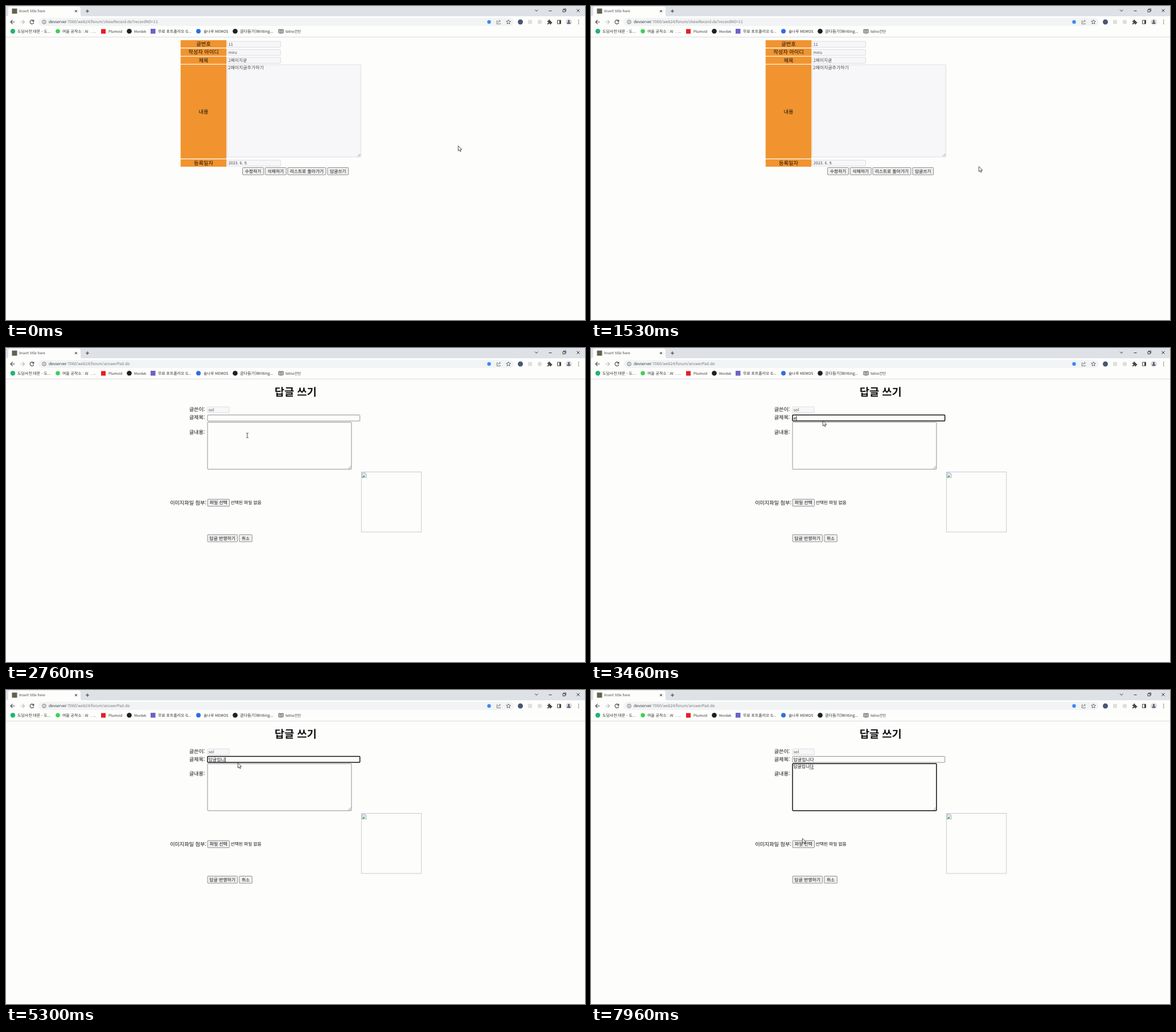
Recreate the animation shown at these times as an HTML page. Size 1017 px wide and 551 px high, loop 8000 ms.

```html
<!DOCTYPE html>
<html lang="ko">
<head>
<meta charset="utf-8">
<title>Reply form</title>
<style>
html, body { margin: 0; width: 100%; height: 100%; overflow: hidden; background: #fdfdfc; }
svg { display: block; width: 100vw; height: 100vh; }
text { font-family: "Noto Sans CJK KR", "Noto Sans CJK", "Open Sans", sans-serif; text-rendering: geometricPrecision; white-space: pre; }
</style>
</head>
<body>
<svg id="stage" viewBox="0 0 1017 551" preserveAspectRatio="none"></svg>
<script>
const LOOP = 8000;
const stage = document.getElementById('stage');

// Markup helpers
const rect = (x, y, w, h, fill, more = '') =>
  `<rect x="${x}" y="${y}" width="${w}" height="${h}" fill="${fill}" ${more}/>`;
const circle = (x, y, r, fill, more = '') =>
  `<circle cx="${x}" cy="${y}" r="${r}" fill="${fill}" ${more}/>`;
const line = (d, color = '#444', width = 1, more = '') =>
  `<path d="${d}" fill="none" stroke="${color}" stroke-width="${width}" ${more}/>`;
const text = (x, y, size, str, fill = '#111', more = '') =>
  `<text x="${x}" y="${y}" font-size="${size}" fill="${fill}" ${more}>${str}</text>`;
const box = (x, y, w, h, stroke, fill = '#fdfdfc', more = '') =>
  rect(x, y, w, h, fill, `stroke="${stroke}" stroke-width=".8" rx="1" ${more}`);
const disabled = (x, y, w, h) => box(x, y, w, h, '#d6d6da', '#f7f7fa');
const button = (x, y, w, h, label, size = 7.75, id = '') =>
  box(x, y, w, h, '#767676', '#efefef', id && `id="${id}"`) +
  text(x + w / 2, y + h / 2 + 2.9, size, label, '#111', 'text-anchor="middle"');
const grip = (x, y) => line(`M${x - 5} ${y}l5-5M${x - 2.2} ${y}l2.2-2.2`, '#777', .7);

function browser() {
  const marks = [
    [20, 6.95, '도담사전:대문 - 도...'], [99, 6.9, '여울 공작소 : AI  . ...'],
    [180, 6.25, 'Plumvid'], [225, 6.1, 'Mordek'], [267, 6.9, '무료 포트폴리오 G...'],
    [347, 6.6, '솔나루 MEMOS'], [411, 7.1, '글다듬기(Writing...'], [491, 6.4, 'telno간단']
  ];
  return rect(0, 0, 1017, 18, '#dee1e6') +
    '<path d="M1 18q3 0 3-3V5q0-4 4-4H127q4 0 4 4v10q0 3 3 3z" fill="#fdfdfc"/>' +
    rect(0, 18, 1017, 36, '#fdfdfc') + rect(0, 54, 1017, 1, '#dcdce2') +
    rect(10.5, 4.5, 9, 9, '#65604f', 'id="favicon"') +
    text(23, 11.3, 6.36, 'Insert title here', '#444') +
    line('M121 7l4 4m0-4l-4 4', '#333') + line('M140 9h6m-3-3v6', '#333') +
    line('M929 6.5l2.7 2.7 2.7-2.7', '#333') + line('M953.5 8.5h5', '#333') +
    line('M978 6.5h4v4h-4zM979.5 6V5h4v4h-1', '#333', .9) +
    line('M1002.5 5.5l5 5m0-5l-5 5', '#333') +
    line('M15.5 28H8m3.5-3.5L8 28l3.5 3.5', '#444', 1.1) +
    line('M25 28h7.5M29 24.5l3.5 3.5-3.5 3.5', '#bbb', 1.1) +
    `<g id="reload">${line('M48.4 26.2A3.4 3.4 0 1 0 48.8 29', '#444', 1.1)}<path d="M49.3 23.8v3.6h-3.6z" fill="#444"/></g>` +
    `<g id="stop">${line('M42.5 25l6 6m0-6l-6 6', '#444', 1.2)}</g>` +
    rect(57, 21, 835, 14, '#f1f3f4', 'rx="7"') +
    circle(67, 28, 3.3, 'none', 'stroke="#555" stroke-width=".8"') +
    line('M67 27.4v2.4M67 25.8v.9', '#555', .9) +
    text(75, 30.4, 6.83, '<tspan>devserver</tspan><tspan id="path" fill="#777"></tspan>', '#333') +
    circle(848.5, 28, 3.2, '#4285f4') +
    line('M864 26h-1.8v5.5h6V30M864 29.5q.3-3 4-3.2m-1.6-2l2 2-2 2', '#666', .8) +
    line('M882.5 24.2l1.1 2.4 2.7.3-2 1.8.5 2.7-2.3-1.4-2.3 1.4.5-2.7-2-1.8 2.7-.3z', '#444', .8) +
    circle(903.5, 28, 4.5, '#4a5672') + rect(917, 24.5, 7, 7, '#dfdfdf') +
    circle(937.5, 28, 3.8, '#dddde2') +
    '<path d="M951 26h2q-.5-2.3 1.2-2.3t1.2 2.3h2v2q2-.3 2 1.2t-2 1.2v1.8h-2q0-1.7-1.2-1.7t-1.2 1.7h-2v-2q1.7 0 1.7-1.2t-1.7-1.2z" fill="#444"/>' +
    line('M968.5 25h6v6.2h-6z', '#444') + rect(972, 25, 3, 6, '#444') +
    circle(988.5, 28, 5.5, '#d9dce2') + circle(988.5, 26.4, 1.6, '#45484f') +
    '<path d="M985.3 31q0-2.6 3.2-2.6t3.2 2.6z" fill="#45484f"/>' +
    [25, 28, 31].map(y => circle(1005.7, y, .8, '#444')).join('') +
    circle(12, 44.3, 4.2, '#20b573') + circle(91, 44.3, 3.8, '#3fcf5a') +
    rect(167, 40.5, 8, 8, '#e81c24') + circle(216.5, 44.3, 4.3, '#1f2023') +
    rect(254, 40, 8.5, 8.5, '#6a62c8') + circle(338, 44.3, 4, '#2f6fe0') +
    circle(402.5, 44.3, 4.3, '#1f2023') +
    line('M483 41.8q-2-1-4-.6v6q2-.4 4 .6 2-1 4-.6v-6q-2-.4-4 .6v6M480.3 43.2h1.5m-1.5 1.7h1.5m2.4-1.7h1.5m-1.5 1.7h1.5', '#333', .9) +
    marks.map(([x, size, str]) => text(x, 46.7, size, str, '#333')).join('');
}

function article() {
  const rows = [
    [60, 13, '글번호'], [74.4, 13.2, '작성자 아이디'], [88.8, 12.8, '제목'],
    [102.8, 164.9, '내용'], [269, 13, '등록일자']
  ];
  const values = [[62, 7.1, '11'], [76.2, 6.9, 'miru'], [90, 7.6, '2페이지글'], [270.5, 7.1, '2023. 6. 9.']];
  return rows.map(([y, h, label]) => rect(306.7, y, 80.5, h, '#f1942f') +
      text(347, y + h / 2 + 3.4, 9.25, label, '#111', 'text-anchor="middle"')).join('') +
    values.map(([y, size, str]) => disabled(388.7, y, 93.7, 10.4) +
      text(390.8, y + 7.8, size, str, '#484848')).join('') +
    disabled(388.7, 103, 234.6, 162) + grip(622.5, 264) +
    text(390, 110.8, 7.95, '2페이지글추가하기', '#484848') +
    button(415.5, 283.5, 37, 12.7, '수정하기') + button(455.2, 283.5, 37, 12.7, '삭제하기') +
    button(494.8, 283.5, 67, 12.7, '리스트로 돌아가기') +
    button(564.8, 283.5, 36.8, 12.7, '답글쓰기', 7.75, 'replyButton');
}

function replyForm() {
  const label = (x, y, str) => text(x, y, 9.1, str, '#111', 'text-anchor="end"');
  const field = id => `<g id="${id}"><text font-size="7.8" fill="#111"></text>` +
    rect(0, 0, 0, .7, '#111') + rect(0, 0, .9, 8.2, '#111') + '</g>';
  return text(508.7, 83.6, 18.7, '답글 쓰기', '#111', 'text-anchor="middle" font-weight="700"') +
    label(349.3, 111.4, '글쓴이:') + label(349.3, 125.4, '글제목:') +
    disabled(354, 103.2, 38, 10.4) + text(355.8, 110.9, 7.1, 'sol', '#555') +
    '<g id="lower">' +
    box(354, 116.5, 267.6, 10.6, '#767676', '#fdfdfc', 'id="titleBox"') +
    box(354, 129.3, 252.8, 82.5, '#767676', '#fdfdfc', 'id="bodyBox"') + grip(606, 211) +
    field('title') + field('body') +
    label(349.3, 149.6, '글내용:') + label(351.8, 274, '이미지파일 첨부:') +
    button(354, 264.3, 38.5, 12.4, '파일 선택', 7.9) +
    text(394.5, 273.3, 7.75, '선택된 파일 없음') +
    rect(624.3, 216.5, 105.4, 105.4, 'none', 'stroke="#c4c4c4" stroke-width=".9"') +
    '<path d="M625.3 218h5.5l2.2 2.2v6.3h-7.7z" fill="#dbe5f5" stroke="#8f9aa8" stroke-width=".7"/>' +
    '<path d="M626 225.6l2.6-3.2 2 1.5-1.6 2z" fill="#4ca64c"/>' +
    line('M628.8 227l4.5-4', '#fdfdfc', 1) +
    button(354, 326.6, 52.5, 12.4, '답글 반영하기', 7.9) + button(409.7, 326.6, 22.6, 12.4, '취소', 7.5) +
    '</g>';
}

stage.innerHTML = rect(0, 0, 1017, 551, '#fdfdfc') + browser() +
  `<g id="article">${article()}</g><g id="form">${replyForm()}</g>` +
  '<path id="arrow" d="M.3.3v9l2.1-1.9 1.5 3 1.3-.6-1.4-3h2.9z" fill="#fff" stroke="#222" stroke-width=".8"/>' +
  `<g id="beam">${line('M-2-4h1.5l.5.5.5-.5H2M0-3.5v7M-2 4h1.5l.5-.5.5.5H2', '#222', .8)}</g>`;

const el = id => document.getElementById(id);
const show = (id, on) => el(id).setAttribute('visibility', on ? 'visible' : 'hidden');
const set = (node, attrs) => { for (const k in attrs) node.setAttribute(k, attrs[k]); };

// Pointer stops: time, x, y
const stops = [
  [0, 794, 245], [250, 790, 247], [710, 771, 252], [810, 766, 254], [1180, 724, 271],
  [1430, 724, 271], [1740, 592, 303], [1930, 577, 293], [2330, 577, 293],
  [2760, 424, 153.5], [2900, 404, 132.5], [2930, 404, 131.5], [3100, 404, 131.5],
  [3180, 407, 125], [3300, 407, 127.5], [7640, 407, 127.5], [7960, 371, 260]
];

function pointer(t) {
  const i = stops.findIndex(s => s[0] > t);
  if (i < 0) return stops.at(-1).slice(1);
  const [a, b] = [stops[i - 1], stops[i]];
  let k = (t - a[0]) / (b[0] - a[0]);
  if (a[0] === 7640) k = k * k * (3 - 2 * k);
  return [a[1] + (b[1] - a[1]) * k, a[2] + (b[2] - a[2]) * k];
}

// Each key press leaves one state of the syllables being composed
const steps = '답글입니다'.split('').length && [
  'ㄷ', '다', '답', '답ㄱ', '답그', '답글', '답글ㅇ', '답글이', '답글입',
  '답글입ㄴ', '답글입니', '답글입니ㄷ', '답글입니다'
];
const typed = times => times.map((time, i) => [time, steps[i]]);
const PAGE = 2330, CLICK = 3150, HANGUL = 4130, TAB = 5530;
const titleKeys = [[CLICK, ''], [3460, 'e'], [3600, 'ek'], [3830, 'e'], [4000, ''],
  ...typed([HANGUL, 4300, 4400, 4530, 4660, 4830, 4930, 5000, 5080, 5180, 5260, 5340, 5420])];
const bodyKeys = [[TAB, ''],
  ...typed([5830, 6100, 6200, 6360, 6480, 6560, 6730, 6800, 6870, 6950, 7020, 7090, 7160])];

function drawField(id, keys, x, y, t, focused) {
  const [time, str] = keys.findLast(k => k[0] <= t) || [0, ''];
  const [label, under, caret] = el(id).children;
  label.textContent = str;
  set(label, { x, y });
  const end = x + (str ? label.getComputedTextLength() : 0);
  const composing = focused && /[ㄱ-힣]$/.test(str);
  set(under, { x: end - 7.1, y: y + 1, width: composing ? 7 : 0 });
  const lit = focused && (t - time) % 1000 < 500;
  set(caret, { x: end + .2, y: y - 6.6, width: lit ? .9 : 0 });
}

function outline(id, focused) {
  set(el(id), { stroke: focused ? '#101010' : '#767676', 'stroke-width': focused ? 1.5 : .8 });
}

function draw(t) {
  const onForm = t >= PAGE;
  const loading = t >= 2100 && t < 2480;
  show('article', !onForm);
  show('form', onForm);
  show('favicon', !loading);
  show('reload', !loading);
  show('stop', loading);
  el('path').textContent = ':7060/web24/forum/' + (onForm ? 'answerPad.do' : 'showRecord.do?recordNO=11');

  const [x, y] = pointer(t);
  const over = x > 564 && x < 602 && y > 283 && y < 297;
  set(el('replyButton'), { fill: over ? '#e4e4e4' : '#efefef', stroke: over ? '#4c4c4c' : '#767676' });
  const beam = t >= 2600 && t < 3300;
  show('beam', beam);
  show('arrow', !beam);
  set(el(beam ? 'beam' : 'arrow'), { transform: `translate(${x} ${y})` });

  const inTitle = t >= CLICK && t < TAB, inBody = t >= TAB;
  set(el('lower'), { transform: `translate(0 ${t < HANGUL ? 1 : 0})` });
  outline('titleBox', inTitle);
  outline('bodyBox', inBody);
  drawField('title', titleKeys, 355.8, 124.8, t, inTitle);
  drawField('body', bodyKeys, 355.4, 137.3, t, inBody);
}

const start = performance.now();
function tick() {
  draw((performance.now() - start) % LOOP);
  requestAnimationFrame(tick);
}
tick();
</script>
</body>
</html>
```
